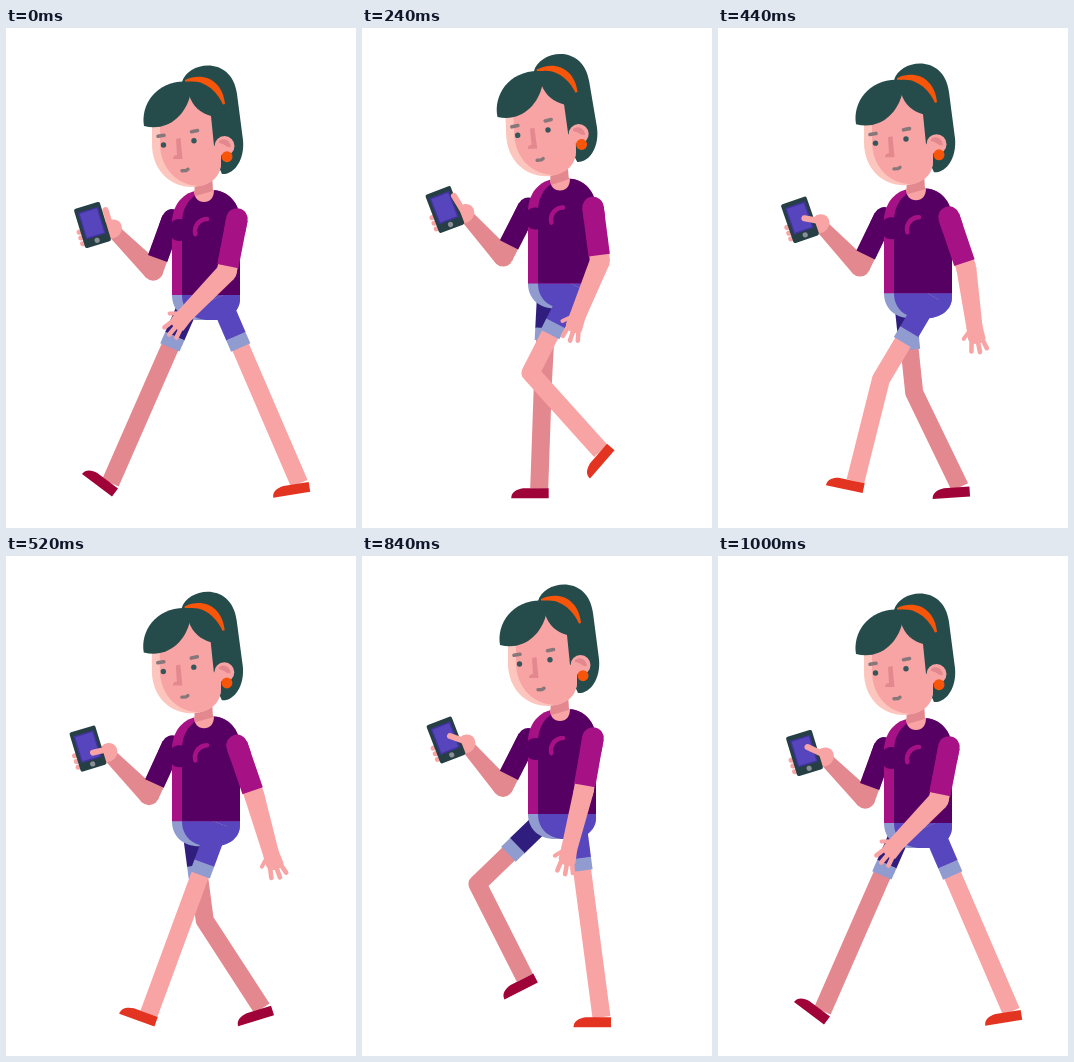
Recreate the animation shown at these times as an HTML page with a canvas. Size 350x500 px, loop 1040 ms.

```html
<!DOCTYPE html>
<html lang="en">
<head>
<meta charset="utf-8">
<title>Walking with a phone</title>
<style>
html, body { margin: 0; width: 100%; height: 100%; overflow: hidden; background: #fff; }
canvas { display: block; }
</style>
</head>
<body>
<canvas id="stage" width="350" height="500"></canvas>
<script>
const ctx = document.getElementById('stage').getContext('2d');
const LOOP = 1040, STEP = 40;
const C = {
  skin: '#f9a4a4', shade: '#e3888f', glow: '#fcc5bd',
  hair: '#254c4b', orange: '#f7550a', eye: '#33575a', brow: '#85777a',
  top: '#560064', pink: '#a61186',
  shorts: '#5746bd', shortsFar: '#301e7e', cuff: '#909bd0',
  shoe: '#e23420', shoeFar: '#a00337',
  phone: '#263f45', screen: '#5745bd', frame: '#40339a', button: '#8b8f95'
};

// Joint angles: degrees from straight down, positive towards the right.
const near = {
  x: 213, skin: C.skin, cloth: C.shorts, shoe: C.shoe,
  thigh: [0,23.3, 120,-1.7, 180,-15, 240,-27, 300,-35, 360,-38, 430,-32, 480,-24.5, 520,-20.2, 680,-7.3, 840,7.5, 1000,23.3],
  shin: [0,23.3, 120,40.5, 180,46, 240,42, 300,30, 360,13.2, 430,-11, 480,-23, 520,-20.2, 680,-7.3, 840,7.5, 1000,23.3],
  foot: [0,-9, 120,-37, 200,-55, 280,-38, 360,-11, 440,12, 520,20, 580,0, 840,0, 920,-2, 1000,-9]
};
const far = {
  x: 186, skin: C.shade, cloth: C.shortsFar, shoe: C.shoeFar,
  thigh: [0,-23.7, 120,-13.9, 240,-3, 360,3, 520,7.5, 600,-1, 680,-14.5, 760,-34, 840,-46, 920,-38, 1000,-23.7],
  shin: [0,-23.7, 120,-13.9, 240,-2, 360,17.7, 520,33, 600,41, 680,45, 760,40, 840,26.8, 920,-3, 1000,-23.7],
  foot: [0,37, 60,14, 110,0, 360,0, 440,-4, 520,-17, 600,-45, 680,-62, 760,-50, 840,-27, 920,10, 1000,37]
};
const body = {
  hem: [0,267, 20,265.3, 120,260, 180,256.4, 250,255.5, 340,258, 360,259.8, 500,267],
  head: [0,0, 120,-3, 180,-3.2, 340,0, 500,0],
  upper: [0,-11, 120,-6, 360,18, 520,19, 680,2.5, 840,-10, 1000,-11],
  fore: [0,-44, 120,-36, 360,-5.5, 520,16, 680,5, 840,-14, 1000,-44],
  farUpper: [0,-20, 120,-26.5, 360,-27, 520,-24.7, 680,-29.6, 840,-27, 1000,-20],
  phoneX: [0,86.5, 120,84.5, 360,82, 520,82, 680,82.3, 840,84, 1000,86.5],
  phoneY: [0,-70, 120,-74, 360,-74, 520,-72.7, 680,-75.5, 840,-74, 1000,-70],
  phoneTurn: [0,-17, 120,-20, 360,-21, 520,-17, 680,-21, 840,-21, 1000,-17],
  thumbX: [0,13, 120,13, 220,10, 360,4, 520,5, 680,6, 840,4, 1000,3],
  thumbY: [0,-15, 120,-15, 220,-14, 360,-9, 520,4, 680,2, 840,-4, 1000,-6]
};

const rad = d => d * Math.PI / 180;
const along = (p, deg, len) => [p[0] + Math.sin(rad(deg)) * len, p[1] + Math.cos(rad(deg)) * len];

// Monotone cubic through time/value pairs; wraps when both ends agree.
function at(keys, t) {
  const n = keys.length / 2, T = i => keys[2 * i], V = i => keys[2 * i + 1];
  const loops = V(0) === V(n - 1);
  const rise = i => {
    if (i < 0 || i > n - 2) {
      if (!loops) return 0;
      i = i < 0 ? n - 2 : 0;
    }
    return (V(i + 1) - V(i)) / (T(i + 1) - T(i));
  };
  const slope = i => {
    const a = rise(i - 1), b = rise(i);
    return a * b <= 0 ? 0 : 2 * a * b / (a + b);
  };
  let i = 0;
  while (i < n - 2 && t >= T(i + 1)) i++;
  const h = T(i + 1) - T(i), u = (t - T(i)) / h, w = 1 - u;
  return (1 + 2 * u) * w * w * V(i) + u * w * w * h * slope(i)
    + u * u * (3 - 2 * u) * V(i + 1) - u * u * w * h * slope(i + 1);
}

function fill(d, color) {
  ctx.fillStyle = color;
  ctx.fill(typeof d === 'string' ? new Path2D(d) : d);
}

function disc(x, y, r, color) {
  ctx.fillStyle = color;
  ctx.beginPath();
  ctx.arc(x, y, r, 0, 7);
  ctx.fill();
}

function line(pts, width, color, cap = 'butt') {
  ctx.strokeStyle = color;
  ctx.lineWidth = width;
  ctx.lineCap = cap;
  ctx.lineJoin = 'round';
  ctx.beginPath();
  pts.forEach(p => ctx.lineTo(p[0], p[1]));
  ctx.stroke();
}

function taper(a, b, wa, wb, color) {
  const dx = b[0] - a[0], dy = b[1] - a[1], len = Math.hypot(dx, dy);
  const nx = -dy / len / 2, ny = dx / len / 2;
  ctx.fillStyle = color;
  ctx.beginPath();
  ctx.moveTo(a[0] + nx * wa, a[1] + ny * wa);
  ctx.lineTo(b[0] + nx * wb, b[1] + ny * wb);
  ctx.lineTo(b[0] - nx * wb, b[1] - ny * wb);
  ctx.lineTo(a[0] - nx * wa, a[1] - ny * wa);
  ctx.fill();
  disc(a[0], a[1], wa / 2, color);
}

function placed(x, y, deg, draw) {
  ctx.save();
  ctx.translate(x, y);
  ctx.rotate(rad(deg));
  draw();
  ctx.restore();
}

// Fills a shape with its rim colour, then the same shape shifted inside it.
function rimmed(d, rim, main, dx, dy = 0) {
  const p = new Path2D(d);
  fill(p, rim);
  ctx.save();
  ctx.clip(p);
  ctx.translate(dx, dy);
  fill(p, main);
  ctx.restore();
}

function leg(l, t, hem) {
  const hip = [l.x, hem + 2], a = at(l.thigh, t);
  const knee = along(hip, a, 98), ankle = along(knee, at(l.shin, t), 105);
  line([hip, knee, ankle], 18, l.skin);
  line([hip, along(hip, a, 43)], 21, l.cloth);
  line([along(hip, a, 42.5), along(hip, a, 55)], 21, C.cuff);
  placed(ankle[0], ankle[1], at(l.foot, t), () =>
    fill('M9.5 0 L-16 0 C-23 1 -28 4 -28 10 L9.5 10 Z', l.shoe));
}

function phoneArm(t, hem) {
  const px = at(body.phoneX, t), py = hem + at(body.phoneY, t);
  const shoulder = [166, hem - 76], a = at(body.farUpper, t);
  const elbow = along(shoulder, a, 55), wrist = [px + 22, py + 7];
  line([shoulder, elbow], 20, C.shade);
  taper(elbow, wrist, 20, 14, C.shade);
  line([shoulder, along(shoulder, a, 10)], 20, C.top, 'round');
  line([shoulder, along(shoulder, a, 42)], 20.5, C.top);

  const turn = at(body.phoneTurn, t);
  placed(px, py, turn, () => {
    for (let i = 0; i < 3; i++) line([[-8, 4 + i * 6], [-15, 3 + i * 6]], 5, C.skin, 'round');
  });
  const thumb = [px + at(body.thumbX, t), py + at(body.thumbY, t)];
  const over = t > 200;
  const hand = () => {
    line([[px + 18, py + 1], thumb], 6, C.skin, 'round');
  };
  if (!over) hand();
  placed(px + 20, py + 4, 42, () => {
    ctx.fillStyle = C.skin;
    ctx.beginPath();
    ctx.ellipse(0, 0, 9, 10, 0, 0, 7);
    ctx.fill();
  });
  placed(px, py, turn, () => {
    const box = (x, y, w, h, r, color) => {
      ctx.fillStyle = color;
      ctx.beginPath();
      ctx.roundRect(x, y, w, h, r);
      ctx.fill();
    };
    box(-13.5, -20.5, 27, 41, 2, C.phone);
    box(-10.5, -16, 21, 28, 0, C.frame);
    box(-9, -14.5, 18, 25, 0, C.screen);
    disc(0, 16, 2.6, C.button);
  });
  if (over) hand();
}

function pelvis(y) {
  rimmed(`M166 ${y - 4} H234 V${y + 4} C234 ${y + 17} 222 ${y + 25} 208 ${y + 25}
    H193 C177 ${y + 25} 166 ${y + 15} 166 ${y} Z`, C.cuff, C.shorts, 10);
}

function torso(y) {
  ctx.save();
  ctx.translate(0, y - 267);
  rimmed('M166 267 V193 C167 174 180 162 197 162 H205 C222 162 234 175 234 193 V267 Z', C.pink, C.top, 10);
  disc(173.5, 202, 11, C.top);
  ctx.strokeStyle = C.pink;
  ctx.lineWidth = 4.5;
  ctx.lineCap = 'round';
  ctx.beginPath();
  ctx.arc(201, 203, 12, rad(165), rad(270));
  ctx.stroke();
  // Neckline
  fill('M188 162 H208 C208 170 204 174 198 174 C192 174 188 170 188 162 Z', C.skin);
  ctx.restore();
}

function head(y, deg) {
  ctx.save();
  ctx.translate(0, y - 267);
  placed(203, 165, deg, () => {
    ctx.translate(-203, -165);
    fill('M176 54 C182 33 226 27 231 66 L237 112 C239 132 228 147 216 146 L205 122 L180 60 Z', C.hair);
    fill('M179 52 C198 43 217 53 219 76 L215 77 C209 62 198 54 179 55 Z', C.orange);
    fill('M188 150 L206 145 L207 163 L189 168 Z', C.shade);
    rimmed('M146 88 V116 C146 142 164 159 186 159 C203 158 215 150 215 134 V80 L184 58 Z', C.glow, C.skin, 8, -1);
    fill('M138 98 C134 75 153 50 185 54 L184 68 C179 88 161 104 138 98 Z', C.hair);
    fill('M182 54 C200 51 214 66 219 82 L226 100 L222 118 H208 L205 88 C195 85 187 79 183 67 Z', C.hair);
    disc(218.5, 118, 10, C.skin);
    fill('M213 113 C218 109 224 112 225 119 C220 120 218 115 213 115 Z', C.shade);
    disc(221, 128.7, 5.5, C.orange);

    line([[152, 108.3], [158, 107.3]], 3.6, C.brow, 'round');
    line([[185.5, 103.7], [191.5, 102.5]], 3.6, C.brow, 'round');
    disc(157.5, 117, 2.7, C.eye);
    disc(188, 112.8, 2.7, C.eye);
    fill('M170 111 L174.5 110 L176.5 131 L167 131 C167 128 169 127 171 127 Z', C.shade);
    line([[176, 142.7], [180, 142.5], [182, 141.2]], 3.4, C.brow, 'round');
  });
  ctx.restore();
}

function nearArm(t, hem) {
  const shoulder = [231, hem - 76], a = at(body.upper, t), b = at(body.fore, t);
  const elbow = along(shoulder, a, 54), wrist = along(elbow, b, 61);
  line([shoulder, elbow], 20, C.skin);
  taper(elbow, wrist, 20, 16, C.skin);
  placed(wrist[0], wrist[1], -b, () => {
    fill('M-8 -2 H8 L9.5 11 C6 17 -5 17 -8 10 Z', C.skin);
    const finger = (from, deg, len, w) => line([from, along([0, 0], deg, len)], w, C.skin, 'round');
    finger([-5, 1], -55, 15, 4);
    finger([-4, 7], -16, 23, 4.6);
    finger([1, 8], 5, 24, 4.6);
    finger([5, 8], 24, 23, 4.6);
  });
  line([shoulder, along(shoulder, a, 10)], 21.5, C.pink, 'round');
  line([shoulder, along(shoulder, a, 48)], 21.5, C.pink);
}

function draw(t) {
  const beat = t % 500, hem = at(body.hem, beat);
  ctx.fillStyle = '#fff';
  ctx.fillRect(0, 0, 350, 500);
  phoneArm(t, hem);
  leg(far, t, hem);
  pelvis(hem);
  leg(near, t, hem);
  torso(hem);
  head(hem, at(body.head, beat));
  nearArm(t, hem);
}

function tick() {
  draw(Math.floor(performance.now() % LOOP / STEP) * STEP);
  requestAnimationFrame(tick);
}
tick();
</script>
</body>
</html>
```
